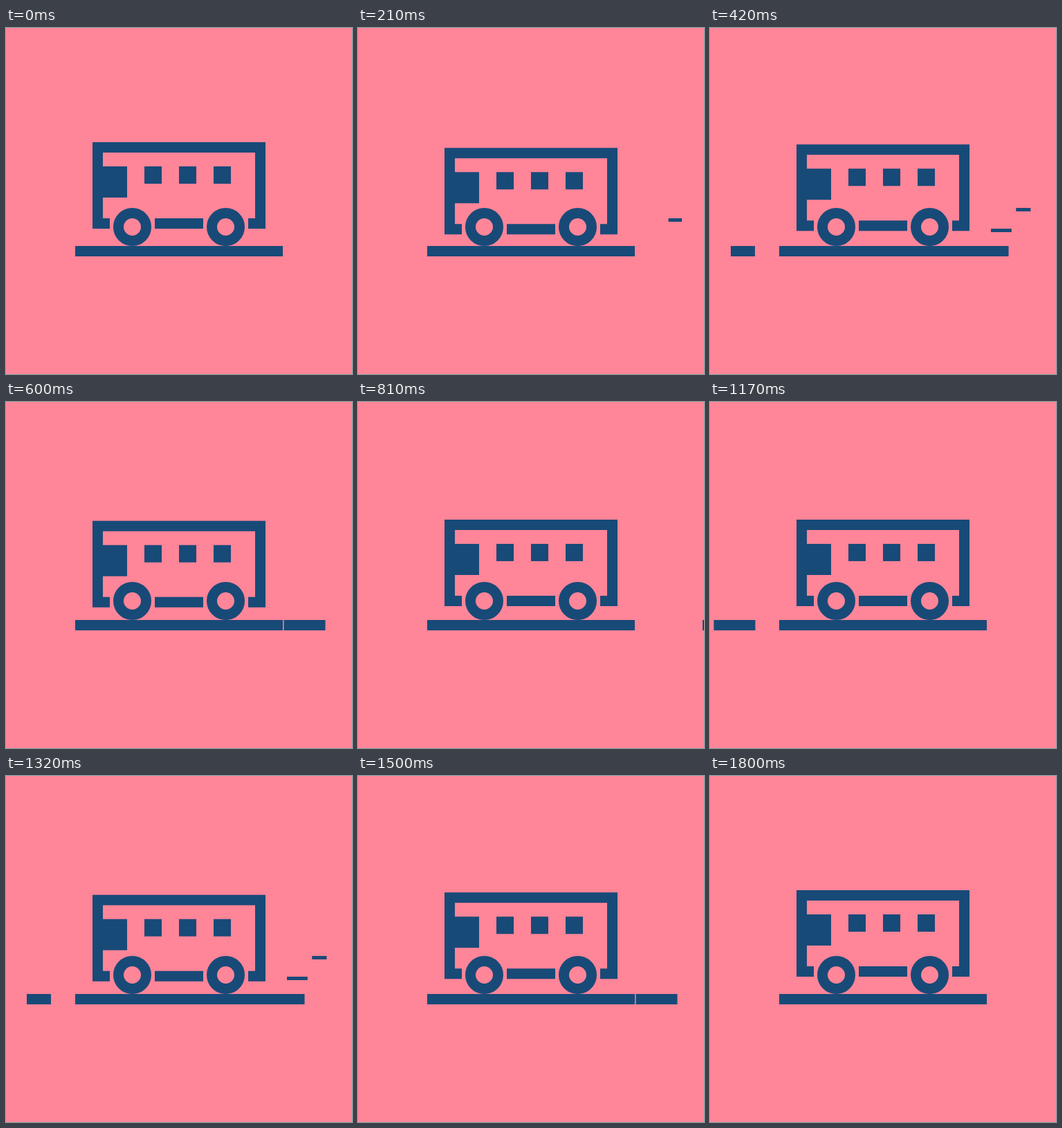
An HTML page for the animation above (1.86 s loop, 500 by 500 pixels).

```html
<!DOCTYPE html>
<html lang="en">
<head>
<meta charset="utf-8">
<title>Bus ride</title>
<style>
  html, body { margin: 0; width: 100%; height: 100%; overflow: hidden; background: #ff8598; }
  svg { display: block; width: 100%; height: 100%; }
</style>
</head>
<body>
<svg viewBox="0 0 500 500" fill="#184a78">
  <g id="road"></g>
  <g id="puffs"></g>
  <path d="M100 315h300v15h-300z"/>
  <g id="bus">
    <path d="M150 282.5H132.5V172.5H367.5V282.5H350M215 282.5H285" fill="none" stroke="#184a78" stroke-width="15"/>
    <path d="M140 200h35v45h-35zM200 200h25v25h-25zM250 200h25v25h-25zM300 200h25v25h-25z"/>
  </g>
  <g fill="none" stroke="#184a78" stroke-width="15">
    <circle cx="182.5" cy="287.5" r="20"/>
    <circle cx="317.5" cy="287.5" r="20"/>
  </g>
</svg>
<script>
  const LOOP = 1860, STEP = 30, END = 1800, CYCLE = 900, BOB = 360, SPEED = 1.2;

  const dashes = [
    { x: -107.5, w: 35 },
    { x: -318.5, w: 60 },
    { x: -474, w: 35 }
  ];
  const puffs = [
    { y: 275, start: 60, time: 180, len: 70 },
    { y: 260, start: 300, time: 150, len: 66 },
    { y: 290, start: 360, time: 210, len: 73 }
  ];

  const byId = id => document.getElementById(id);
  const bus = byId('bus');

  function addRect(parent, attrs) {
    const rect = document.createElementNS('http://www.w3.org/2000/svg', 'rect');
    for (const key in attrs) rect.setAttribute(key, attrs[key]);
    return byId(parent).appendChild(rect);
  }
  for (const d of dashes) d.el = addRect('road', { y: 315, width: d.w, height: 15 });
  for (const p of puffs) p.el = addRect('puffs', { y: p.y, height: 5 });

  function draw(t) {
    const tau = t % CYCLE;
    const phase = t % BOB / BOB;
    bus.setAttribute('transform', `translate(0 ${10 * (1 - Math.abs(1 - 2 * phase))})`);

    for (const d of dashes) d.el.setAttribute('x', d.x + SPEED * tau);

    // The head of each puff eases out while its tail eases in.
    for (const p of puffs) {
      const u = Math.min(1, Math.max(0, (tau - p.start) / p.time));
      p.el.setAttribute('x', 400 + p.len * u * u);
      p.el.setAttribute('width', p.len * 2 * u * (1 - u));
    }
  }

  const origin = performance.now();
  function tick() {
    const t = (performance.now() - origin) % LOOP;
    draw(Math.min(END, Math.floor(t / STEP) * STEP));
    requestAnimationFrame(tick);
  }
  tick();
</script>
</body>
</html>
```
